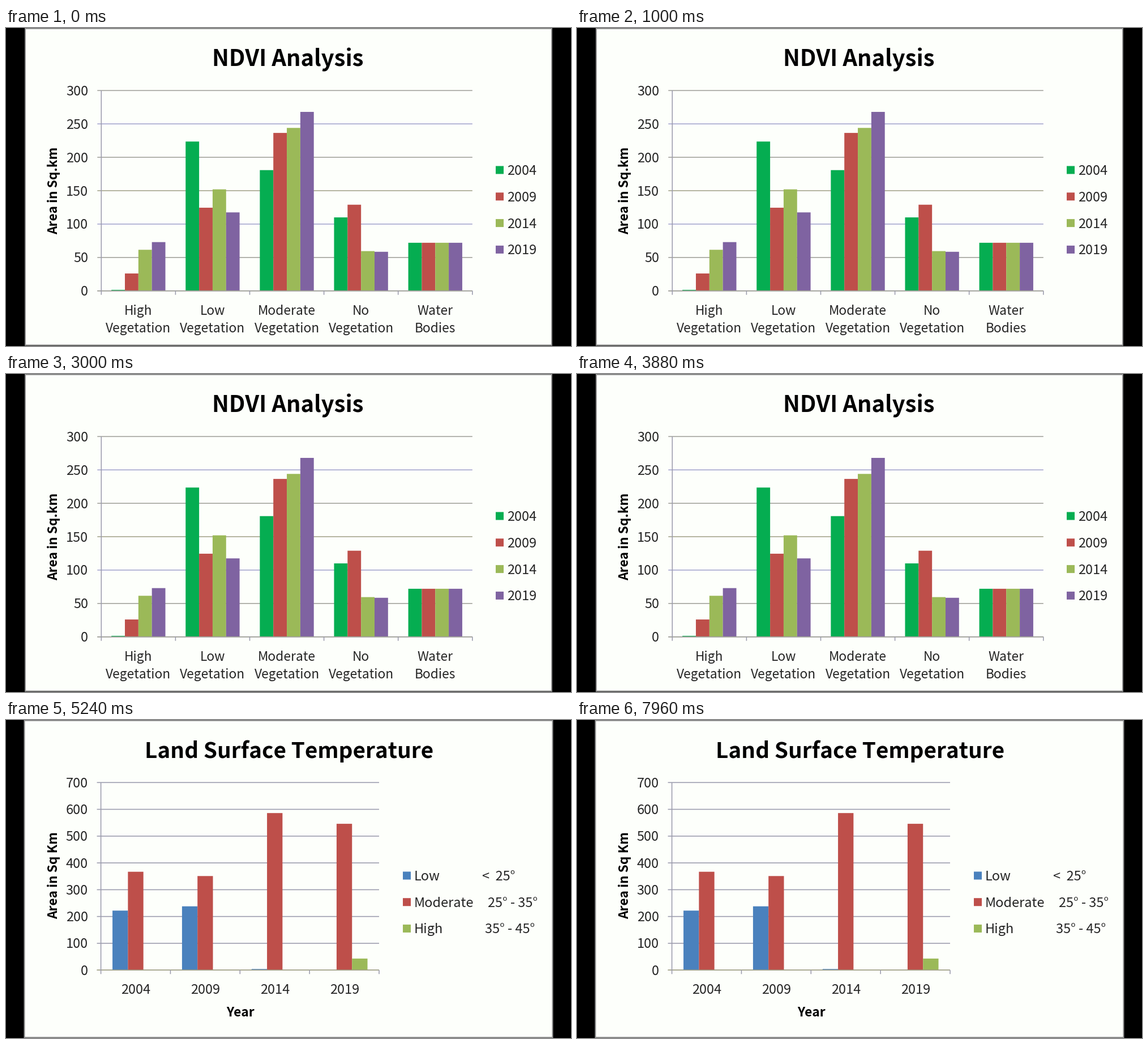
These frames come from a looping animation (998x561 px, 8000 ms). A matplotlib script:

```python
import matplotlib.pyplot as plt
from matplotlib.animation import FuncAnimation
from matplotlib.patches import Rectangle

W, H, DPI = 998, 561, 64
STEP, FRAMES = 40, 200
CUT = 4360  # ms at which the second chart replaces the first

PAPER, EDGE, INK = "#fdfffb", "#8c8c8c", "#262626"
GREEN, RED, OLIVE = "#05ad51", "#be4f4a", "#9bb958"
PURPLE, BLUE = "#7f63a1", "#4a81bd"
GREY, LILAC, KHAKI, SLATE = "#a2a29c", "#a6a6cf", "#a5a58c", "#9c9cae"

plt.rcParams["font.family"] = "Noto Sans CJK JP"
fig = plt.figure(figsize=(W / DPI, H / DPI), dpi=DPI, facecolor="black")
ax = fig.add_axes([0, 0, 1, 1])
ax.set_xlim(0, W)
ax.set_ylim(H, 0)
ax.axis("off")


class Slide:
    """A group of artists placed in pixel coordinates."""

    def __init__(self, left, right, bottom):
        self.items = []
        self.box(left, 0, right, bottom, EDGE)
        self.box(left + 2, 2, right - 2, bottom - 2, PAPER)

    def box(self, x0, y0, x1, y1, color):
        patch = Rectangle((x0, y0), x1 - x0, y1 - y0, fc=color, lw=0,
                          zorder=len(self.items), snap=False)
        self.items.append(ax.add_patch(patch))

    def hline(self, x0, x1, y, color):
        self.box(x0, y - 0.8, x1, y + 0.8, color)

    def vline(self, x, y0, y1, color):
        self.box(x - 0.8, y0, x + 0.8, y1, color)

    def text(self, x, y, s, size=23.6, ha="center", bold=False, turn=0):
        self.items.append(ax.text(
            x, y, s, fontsize=size * 72 / DPI, ha=ha, va="baseline",
            weight="bold" if bold else "normal", rotation=turn,
            rotation_mode="anchor", color="black" if bold else INK,
            zorder=len(self.items)))

    def chart(self, x0, x1, top, base, peak, step, series, lines):
        """Grid, clustered bars, axes and the value labels."""
        scale = (base - top) / peak
        for i, color in enumerate(lines):
            y = base - i * step * scale
            self.hline(x0 - 7, x1, y, color)
            self.text(x0 - 23, y + 8.5, str(i * step), ha="right")
        groups = len(series[0][1])
        span = (x1 - x0) / groups
        bar = span / (len(series) + 1.5)
        for j, (color, values) in enumerate(series):
            for i, v in enumerate(values):
                x = x0 + i * span + (0.75 + j) * bar
                if v:
                    self.box(x, base - v * scale, x + bar, base, color)
        self.hline(x0 - 7, x1, base, lines[0])
        self.vline(x0, top, base, SLATE)
        for i in range(groups + 1):
            self.vline(x0 + i * span, base, base + 7, SLATE)
        return [x0 + (i + 0.5) * span for i in range(groups)]

    def legend(self, x, y, color, label):
        self.box(x, y - 7, x + 14, y + 7, color)
        self.text(x + 20, y + 8.5, label, ha="left")

    def show(self, on):
        for item in self.items:
            item.set_visible(on)


def ndvi_slide():
    s = Slide(33, 965, 560.5)
    s.text(498, 67, "NDVI Analysis", 40, bold=True)
    series = [(GREEN, (1.5, 223.6, 180.8, 110, 72)),
              (RED, (26, 124.5, 236.5, 129, 72)),
              (OLIVE, (61.5, 152, 244, 59.5, 72)),
              (PURPLE, (73, 117.5, 268, 58.5, 72))]
    lines = [GREY, GREY, LILAC, KHAKI, GREY, LILAC, GREY]
    mids = s.chart(168.3, 823.8, 110.3, 463.7, 300, 50, series, lines)
    names = ["High Vegetation", "Low Vegetation", "Moderate Vegetation",
             "No Vegetation", "Water Bodies"]
    for x, name in zip(mids, names):
        for k, word in enumerate(name.split()):
            s.text(x, 506 + 31 * k, word, 22.8)
    s.text(91, 287, "Area in Sq.km", 22.7, bold=True, turn=90)
    for k, (color, _) in enumerate(series):
        s.legend(865, 250.5 + 46.8 * k, color, str(2004 + 5 * k))
    return s


def heat_slide():
    s = Slide(31.5, 966.5, 561)
    s.text(500, 67, "Land Surface Temperature", 38.7, bold=True)
    series = [(BLUE, (222, 238, 4, 0)),
              (RED, (367, 351, 586, 546)),
              (OLIVE, (0, 0, 0, 43))]
    lines = [KHAKI] + [SLATE] * 7
    mids = s.chart(167.6, 659, 110.3, 441.2, 700, 100, series, lines)
    for k, x in enumerate(mids):
        s.text(x + 0.5, 483, str(2004 + 5 * k))
    s.text(414, 523, "Year", 22.7, bold=True)
    s.text(91, 274.5, "Area in Sq Km", 22.7, bold=True, turn=90)
    rows = [("Low", 841, "<  25°"), ("Moderate", 851, "25° - 35°"),
            ("High", 846, "35° - 45°")]
    for k, (name, x, band) in enumerate(rows):
        y = 274.5 + 46.7 * k
        s.legend(701, y, series[k][0], name)
        s.text(x, y + 8.5, band, ha="left")
    return s


ndvi, heat = ndvi_slide(), heat_slide()


def draw(n):
    late = n * STEP >= CUT
    ndvi.show(not late)
    heat.show(late)
    return []


anim = FuncAnimation(fig, draw, frames=FRAMES, interval=STEP,
                     init_func=lambda: draw(0), repeat=True, repeat_delay=0)
plt.show()
```
